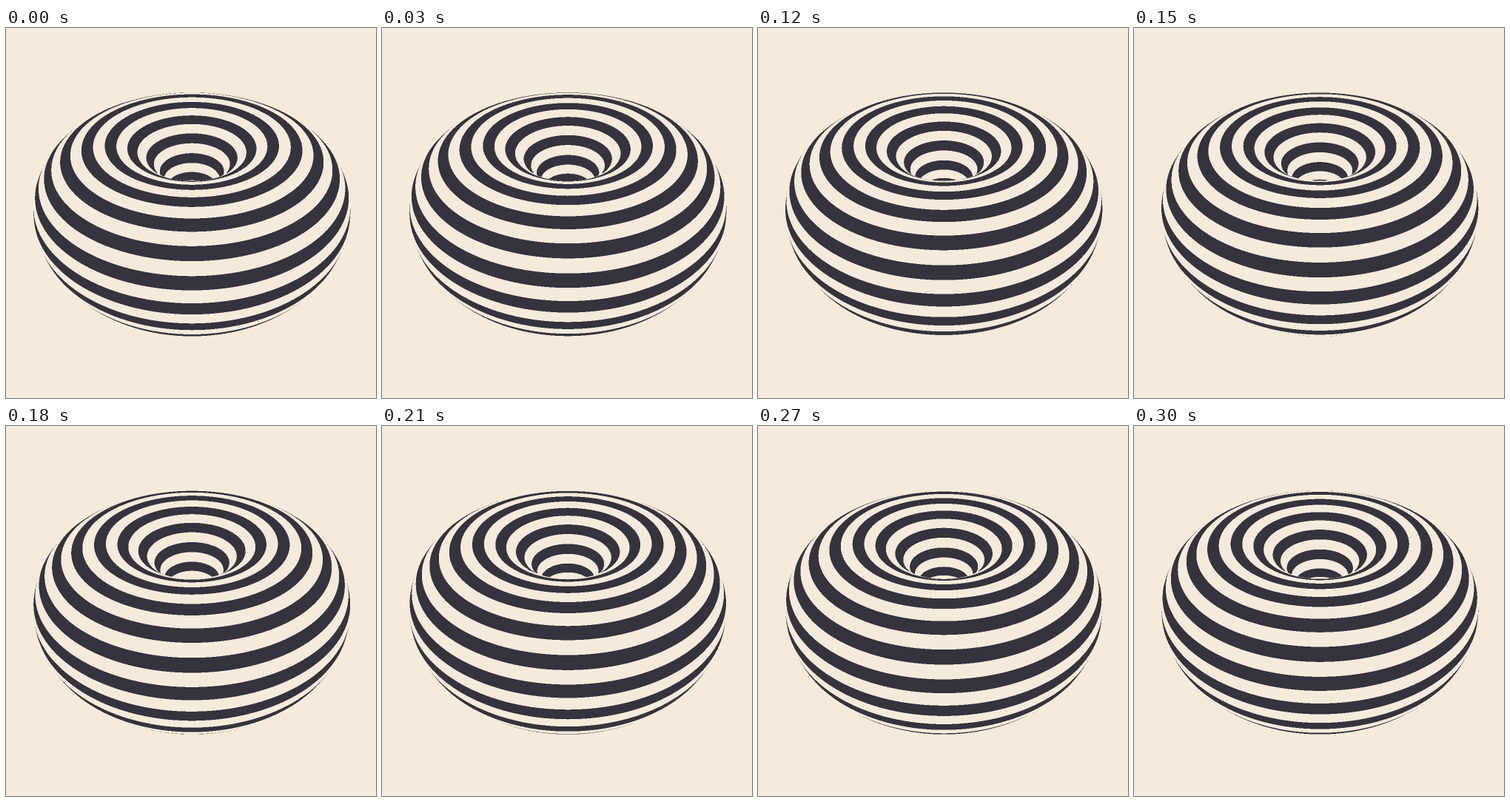
Write an HTML page with a canvas that moves like this. It is 500 px wide and 500 px high and loops after 330 ms.

```html
<!DOCTYPE html>
<html lang="en">
<head>
<meta charset="utf-8">
<title>Striped torus</title>
<style>
  html, body { margin: 0; height: 100%; overflow: hidden; background: #f4ebdc; }
  canvas { display: block; }
</style>
</head>
<body>
<canvas id="stage" width="500" height="500"></canvas>
<script>
const SIZE = 500, GRID = 2, WIDE = SIZE * GRID;
const LIGHT = [244, 235, 220], DARK = [53, 51, 61];
const STEP = 30, STEPS = 11;

// Stripe spacing and first stripe centre, in degrees around the tube
const PITCH = 18.22, START = 30.6;

// Torus radii, tilt, and a pinhole camera at the origin
const MAJOR = 116.9, MINOR = 84.5, TILT = 40.3 * Math.PI / 180;
const FOCAL = 515, RAISE = 26.6, CENTER_X = 251.2, CENTER_Y = 250;
const SIN = Math.sin(TILT), COS = Math.cos(TILT);

const ctx = document.getElementById('stage').getContext('2d');
const image = ctx.createImageData(SIZE, SIZE);

// Stripe coordinate of the surface seen along a ray, NaN when it misses
function stripeAt(px, py) {
  const len = Math.sqrt(px * px + py * py + FOCAL * FOCAL);
  const dx = px / len, dy = py / len, dz = FOCAL / len;
  for (let dist = 270, i = 0; i < 120 && dist < 760; i++) {
    const x = dx * dist, y = dy * dist + RAISE, z = dz * dist - FOCAL;
    const height = -y * COS - z * SIN;
    const near = y * SIN - z * COS;
    const out = Math.sqrt(x * x + near * near) - MAJOR;
    const gap = Math.sqrt(out * out + height * height) - MINOR;
    if (gap < 0.02) {
      // measured from the top of the tube, so the seam lies underneath
      const angle = 90 + Math.atan2(-out, height) * 180 / Math.PI;
      return (angle - START) / PITCH + 0.25;
    }
    dist += gap;
  }
  return NaN;
}

const stripes = new Float32Array(WIDE * WIDE);
for (let j = 0, k = 0; j < WIDE; j++) {
  for (let i = 0; i < WIDE; i++, k++) {
    stripes[k] = stripeAt((i + 0.5) / GRID - CENTER_X, (j + 0.5) / GRID - CENTER_Y);
  }
}

function isDark(k, shift) {
  const s = stripes[k] - shift;
  return s - Math.floor(s) < 0.5 ? 1 : 0;
}

function draw(shift) {
  const data = image.data;
  for (let y = 0, p = 0; y < SIZE; y++) {
    for (let x = 0; x < SIZE; x++, p += 4) {
      const k = (y * WIDE + x) * GRID;
      const ink = (isDark(k, shift) + isDark(k + 1, shift) +
        isDark(k + WIDE, shift) + isDark(k + WIDE + 1, shift)) / 4;
      for (let c = 0; c < 3; c++) data[p + c] = LIGHT[c] + (DARK[c] - LIGHT[c]) * ink;
      data[p + 3] = 255;
    }
  }
  ctx.putImageData(image, 0, 0);
}

let shown = -1;
function tick() {
  const step = Math.floor(performance.now() / STEP) % STEPS;
  if (step !== shown) draw(step / STEPS);
  shown = step;
  requestAnimationFrame(tick);
}
tick();
</script>
</body>
</html>
```
